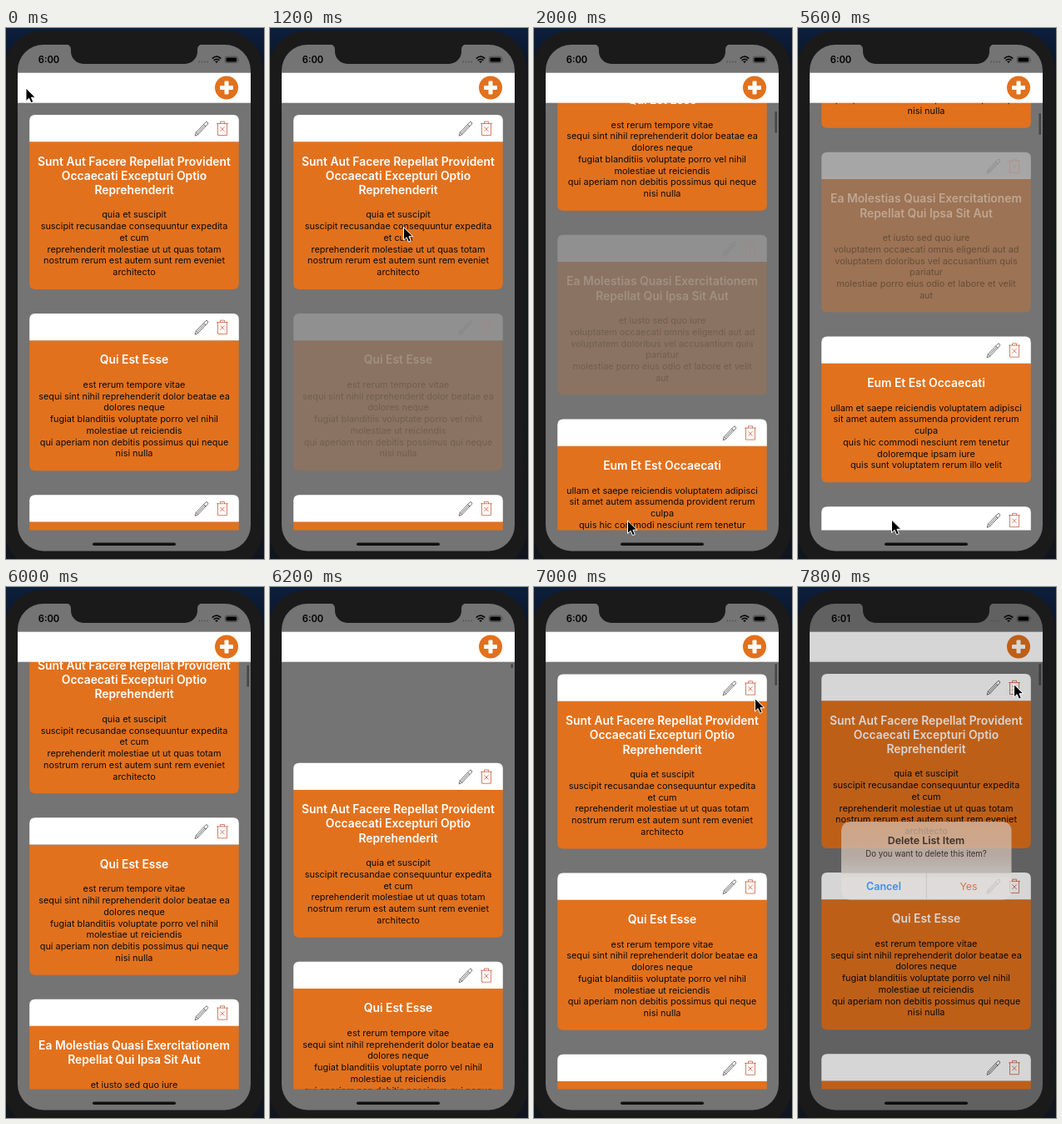
These frames come from a looping animation (310x636 px, 8000 ms). An HTML page:

```html
<!DOCTYPE html>
<html lang="en">
<head>
<meta charset="utf-8">
<title>Card list</title>
<style>
  html, body { margin: 0; width: 100%; height: 100%; overflow: hidden; background: #0b1220; }
  svg { display: block; width: 310px; height: 636px; font-family: Inter, Roboto, sans-serif; }
  text { text-anchor: middle; }
  .title { font-size: 13.85px; font-weight: 600; fill: #fff; }
  .body { font-size: 10.9px; fill: #0c0c0c; }
  .line { fill: none; stroke-linecap: round; stroke-linejoin: round; }
  .card > * { opacity: var(--fade, 1); }
</style>
</head>
<body>
<svg viewBox="0 0 310 636">
  <defs>
    <linearGradient id="desk" x2="0" y2="1">
      <stop offset="0" stop-color="#0c1f3e"/>
      <stop offset=".1" stop-color="#0b1220"/>
      <stop offset="1" stop-color="#10151f"/>
    </linearGradient>
    <linearGradient id="glass" x2="0" y2="1">
      <stop offset="0" stop-color="#d3b8a4"/>
      <stop offset=".45" stop-color="#d0c0b7"/>
      <stop offset=".75" stop-color="#e1dedb"/>
    </linearGradient>
    <clipPath id="screen"><rect x="14" y="20" width="280" height="606.4" rx="31"/></clipPath>
    <clipPath id="viewport"><rect x="14" y="89" width="280" height="512.5"/></clipPath>
    <g id="icons" class="line" stroke-width=".85">
      <path stroke="#555" d="M227.2 24.8L228.4 21 240 8.8q1.2-.9 2.1.1.9 1 .3 2.300L230.800 23.400zM228.400 21l2.400 2.400M237.600 11.400l2.400 2.400M230.400 21.400l8-8.400"/>
      <path stroke="#cb6a48" d="M253.500 10.500h13M257.500 10.200v-2h5v2M254.500 10.600v13.900h11V10.600M257.700 14.800l4.600 4.800M262.300 14.800l-4.600 4.800"/>
    </g>
  </defs>

  <rect width="310" height="636" fill="url(#desk)"/>
  <rect x="-2" y="3" width="311" height="645" rx="47" fill="#1a1a1b"/>

  <g clip-path="url(#screen)">
    <rect x="14" y="20" width="280" height="607" fill="#747474"/>
    <g clip-path="url(#viewport)">
      <g id="list"></g>
      <rect id="bar" x="289.5" width="2.4" rx="1.2" opacity=".42"/>
    </g>

    <rect x="14" y="53.7" width="280" height="36" fill="#fff"/>
    <circle cx="265" cy="71.5" r="14" fill="#e2711d"/>
    <g fill="#fff">
      <rect x="257" y="69" width="16" height="5" rx="1"/>
      <rect x="262.5" y="63.5" width="5" height="16" rx="1"/>
    </g>

    <rect x="104" y="616.500" width="100" height="3.600" rx="1.800" fill="#111"/>
    <rect id="shade" x="14" y="20" width="280" height="607" opacity=".16"/>

    <text id="clock" x="51.5" y="42" font-size="11.2" font-weight="600"></text>
    <path d="M232.300 40.500h12" class="line" stroke="#575757" stroke-width="1.900" stroke-dasharray="0 3.300"/>
    <path d="M247.700 36.600q5.300-4.800 10.600 0M249.600 38.800q3.400-3 6.800 0" fill="none" stroke="#0a0a0a" stroke-width="1.700"/>
    <path d="M251.200 40.200q1.800-1.500 3.600 0l-1.800 1.900z"/>
    <rect x="263.300" y="34.200" width="15" height="7.400" rx="2.200" fill="none" stroke="#3c3c3c" stroke-width=".7"/>
    <rect x="264.500" y="35.400" width="12.600" height="5" rx="1.200"/>
    <path d="M279.300 36.700q1.300 1.200 0 2.400z" fill="#3c3c3c"/>
  </g>

  <path d="M72 19.500q6 .5 6 6.500v2a15 15 0 0 0 15 15h122a15 15 0 0 0 15-15v-2q0-6 6-6.500z" fill="#1a1a1b"/>

  <g id="alert">
    <rect x="52" y="281" width="204.500" height="93.500" rx="10.500" fill="url(#glass)" opacity=".77"/>
    <path d="M52 342.300h204.500M154.300 342.300v32" stroke="#b5b0ac" stroke-width=".7" opacity=".8"/>
    <text x="154" y="308" font-size="12.4" font-weight="600" fill="#3a302b">Delete List Item</text>
    <text x="154" y="323.3" font-size="9.65" fill="#3a302b">Do you want to delete this item?</text>
    <text x="103" y="363" font-size="12.5" font-weight="600" fill="#3f8df0">Cancel</text>
    <text x="205" y="363" font-size="12.3" fill="#d0744c">Yes</text>
  </g>

  <path id="cursor" d="M0 0V15.500L3.600 12.200 6 17.700 8.800 16.500 6.400 11.200H11.300z"
        stroke="#fff" stroke-linejoin="round"/>
</svg>

<script>
const LOOP = 8000, SAMPLE = 200;
const $ = id => document.getElementById(id);

const posts = [
  ["Sunt Aut Facere Repellat Provident|Occaecati Excepturi Optio|Reprehenderit",
   "quia et suscipit|suscipit recusandae consequuntur expedita|et cum|reprehenderit molestiae ut ut quas totam|nostrum rerum est autem sunt rem eveniet|architecto"],
  ["Qui Est Esse",
   "est rerum tempore vitae|sequi sint nihil reprehenderit dolor beatae ea|dolores neque|fugiat blanditiis voluptate porro vel nihil|molestiae ut reiciendis|qui aperiam non debitis possimus qui neque|nisi nulla"],
  ["Ea Molestias Quasi Exercitationem|Repellat Qui Ipsa Sit Aut",
   "et iusto sed quo iure|voluptatem occaecati omnis eligendi aut ad|voluptatem doloribus vel accusantium quis|pariatur|molestiae porro eius odio et labore et velit|aut"],
  ["Eum Et Est Occaecati",
   "ullam et saepe reiciendis voluptatem adipisci|sit amet autem assumenda provident rerum|culpa|quis hic commodi nesciunt rem tenetur|doloremque ipsam iure|quis sunt voluptatem rerum illo velit"],
  ["Nesciunt Quas Odio", "repudiandae veniam quaerat sunt sed"]
];

const lines = (list, cls, y, gap) => list.map((s, i) =>
  `<text class="${cls}" x="154" y="${y + i * gap}">${s}</text>`).join("");

function buildCards() {
  let top = 104, html = "";
  for (const [head, copy] of posts) {
    const titles = head.split("|"), body = copy.split("|");
    const bodyY = 60.5 + 17.2 * (titles.length - 1) + 28.5;
    const h = bodyY + 13.75 * (body.length - 1) + 16.8;
    html += `<g class="card" transform="translate(0 ${top})">
      <path d="M28.2 32.2h251.600V${h - 7}q0 7-7 7H35.200q-7 0-7-7z" fill="#e2711d"/>
      <path d="M28.200 32.200V7q0-7 7-7h237.600q7 0 7 7v25.200z" fill="#fff"/>
      <use href="#icons"/>
      ${lines(titles, "title", 60.5, 17.2)}${lines(body, "body", bodyY, 13.75)}</g>`;
    top += h + 29;
  }
  $("list").innerHTML = html;
}

buildCards();
const cards = [...document.querySelectorAll(".card")];
const show = (el, on) => el.setAttribute("visibility", on ? "visible" : "hidden");
const move = (el, x, y) => el.setAttribute("transform", `translate(${x} ${y})`);
const progress = (t, from, to) => Math.min(1, Math.max(0, (t - from) / (to - from)));

// The screen is sampled at a fixed rate and stalls twice.
const stalls = [[1200, 1600], [2000, 5600]];
function sample(t) {
  const stall = stalls.find(([from, to]) => t >= from && t < to);
  return stall ? stall[0] : Math.floor(t / SAMPLE) * SAMPLE;
}

// Flick up, glide on, flick back past the top, spring to rest.
function scrollAt(t) {
  if (t >= 6200) return -106.8 * Math.exp((6200 - t) / 155);
  return 311.4 * progress(t, 1200, 2000) + 99 * progress(t, 2000, 5600)
    - 517.2 * progress(t, 5600, 6200);
}

// Key points of the pointer: time, x, y
const path = [
  [0, 24, 72], [200, 192, 414], [1000, 188, 404], [1200, 160.5, 238.5],
  [2000, 112.5, 590], [5800, 112.5, 589], [6400, 140, 480], [7000, 265.5, 133.5], [7800, 259.5, 116.5]
];
function pointerAt(t) {
  const i = Math.max(1, path.findIndex(p => p[0] >= t));
  const [a, b] = [path[i - 1], path[i]];
  const k = progress(t, a[0], b[0]);
  return [a[1] + (b[1] - a[1]) * k, a[2] + (b[2] - a[2]) * k];
}

// A pressed card dims, then fades back quickly after release.
const presses = [{ card: 1, down: 1200, up: 1600 }, { card: 2, down: 2000, up: 5600 }];
function fadeAt(card, t) {
  const press = presses.find(p => p.card === card);
  if (!press || t < press.down) return 1;
  return t < press.up ? .2 : .2 + .8 * progress(t, press.up - 50, press.up + 200);
}

function draw(time) {
  const t = sample(time), scroll = scrollAt(t);
  move($("list"), 0, -scroll);
  move($("cursor"), ...pointerAt(t));
  show($("cursor"), t < 6000 || t > 6400);
  cards.forEach((card, i) => card.style.setProperty("--fade", fadeAt(i, t)));

  // The scroll bar shrinks while the list is pulled past its top.
  $("bar").setAttribute("y", 92 + Math.max(0, scroll) * .0245);
  $("bar").setAttribute("height", Math.max(5, 26 + Math.min(0, scroll) * .2));
  show($("bar"), t >= 1600);

  const asking = t >= 7800;
  show($("shade"), asking);
  show($("alert"), asking);
  $("clock").textContent = asking ? "6:01" : "6:00";
}

const start = performance.now();
function tick(now) {
  draw(Math.max(0, now - start) % LOOP);
  requestAnimationFrame(tick);
}
draw(0);
requestAnimationFrame(tick);
</script>
</body>
</html>
```
